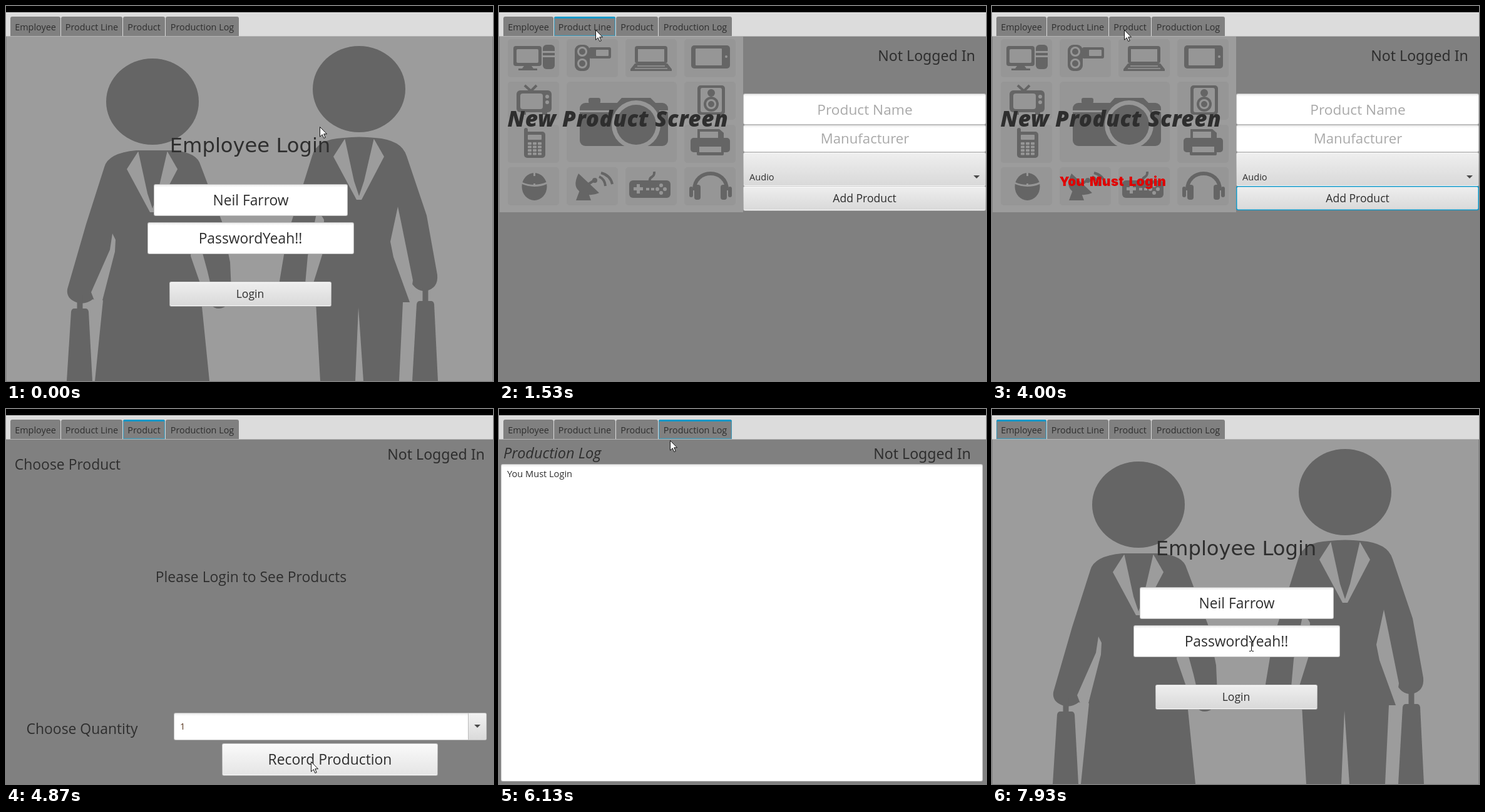
These frames come from a looping animation (778x600 px, 8000 ms). An HTML page with a canvas:

```html
<!DOCTYPE html>
<html lang="en">
<head>
<meta charset="utf-8">
<title>Production tracker</title>
<style>
html, body { margin: 0; width: 100%; height: 100%; overflow: hidden; background: #808080; }
canvas { display: block; width: 778px; height: 600px; }
</style>
</head>
<body>
<canvas id="stage" width="778" height="600"></canvas>
<script>
const ctx = document.getElementById('stage').getContext('2d');
const LOOP = 8000, TICKS_PER_MS = 0.015;
const INK = '#2e2e2e', DARK = '#656565', LIGHT = '#9c9c9c', TILE = '#969696', BLUE = '#0f98c8', RED = '#e00000';
const SANS = '"Open Sans", "Noto Sans", sans-serif';

// Pointer path: tick, x, y
const PATH = [
  [0, 501, 193], [2, 501, 193], [5, 455, 228], [8, 375, 241], [12, 262, 135], [15, 205, 52],
  [19, 154, 38], [26, 154, 38], [31, 260, 130], [36, 440, 280], [39, 470, 302], [41, 460, 300],
  [45, 235, 209], [47, 90, 250], [48, 45, 310], [50, 110, 349], [52, 240, 260], [53, 284, 186],
  [57, 250, 14], [60, 211, 38], [62, 211, 38], [68, 380, 310], [73, 487, 564], [76, 487, 564],
  [80, 190, 581], [82, 30, 575], [83, 16, 540], [86, 190, 190], [88, 285, 46], [90, 296, 39],
  [91, 296, 39], [95, 149, 115], [97, 149, 124], [101, 100, 85], [106, 22, 28], [111, 22, 28],
  [115, 350, 270], [117, 454, 366], [119, 414, 380], [120, 414, 380]
];

function slope(i, k) {
  if (i === 0 || i === PATH.length - 1) return 0;
  const [a, b, c] = [PATH[i - 1], PATH[i], PATH[i + 1]];
  const s = (b[k] - a[k]) / (b[0] - a[0]), r = (c[k] - b[k]) / (c[0] - b[0]);
  return s * r > 0 ? 2 * s * r / (s + r) : 0;
}

function pointerAt(tick) {
  let i = 0;
  while (i < PATH.length - 2 && PATH[i + 1][0] <= tick) i++;
  const a = PATH[i], b = PATH[i + 1], h = b[0] - a[0], u = (tick - a[0]) / h;
  return [1, 2].map(k => {
    const v = 1 - u;
    return a[k] * v * v * (1 + 2 * u) + b[k] * u * u * (3 - 2 * u)
      + h * u * v * (v * slope(i, k) - u * slope(i + 1, k));
  });
}

function rect(x, y, w, h, color, r = 0) {
  ctx.fillStyle = color;
  ctx.beginPath();
  ctx.roundRect(x, y, w, h, r);
  ctx.fill();
}

function oval(x, y, rx, color, ry = rx) {
  ctx.fillStyle = color;
  ctx.beginPath();
  ctx.ellipse(x, y, rx, ry, 0, 0, Math.PI * 2);
  ctx.fill();
}

function shape(d, color) {
  ctx.fillStyle = color;
  ctx.fill(new Path2D(d));
}

function line(d, color, width) {
  ctx.strokeStyle = color;
  ctx.lineWidth = width;
  ctx.stroke(new Path2D(d));
}

function text(str, x, y, size, options = {}) {
  const { color = INK, align = 'center', style = '', family = SANS, spacing = 0, gap = 0 } = options;
  ctx.font = `${style} ${size}px ${family}`;
  ctx.letterSpacing = `${spacing}px`;
  ctx.wordSpacing = `${gap}px`;
  ctx.textAlign = align;
  ctx.fillStyle = color;
  ctx.fillText(str, x, y);
}

const loginState = (x, y) => text('Not Logged In', x, y, 23.1, { family: '"Noto Sans", sans-serif' });

function fade(y, h, from, to) {
  const g = ctx.createLinearGradient(0, y, 0, y + h);
  g.addColorStop(0, from);
  g.addColorStop(1, to);
  return g;
}

const inside = ([px, py], [x, y, w, h]) => px >= x && px < x + w && py >= y && py < y + h;

// An unfocused button shows a one pixel shadow along its bottom
function button(box, { pointer, focus, pressed }) {
  const [x, y, w, h] = box;
  const [from, to] = pressed ? ['#d2d2d2', '#c6c6c6']
    : inside(pointer, box) ? ['#fafafa', '#e4e4e4'] : ['#efefef', '#d8d8d8'];
  if (focus) {
    rect(x, y, w, h - 1, BLUE, 3);
    rect(x + 1.5, y + 1.5, w - 3, h - 4, fade(y, h, from, to), 2);
  } else {
    rect(x, y, w, h, fade(y, h, '#c9c9c9', '#a9a9a9'), 3);
    rect(x + 1, y + 1, w - 2, h - 2, '#fbfbfb', 2);
    rect(x + 1, y + 2, w - 2, h - 4, fade(y, h, from, to), 2);
  }
}

function field(x, y, w, h) {
  rect(x, y, w, h, '#bebebe', 3);
  rect(x + 1, y + 1, w - 2, h - 2, fade(y, 5, '#e4e4e4', '#ffffff'), 2);
}

const caret = (x, y) => shape(`M${x - 5} ${y - 2}h10l-5 5z`, '#4a4a4a');

const TABS = [
  ['Employee', 7, 80], ['Product Line', 88, 98], ['Product', 187, 67], ['Production Log', 255, 117]
];

function header(focused) {
  rect(0, 0, 778, 10, '#000');
  rect(0, 10, 778, 38, '#dcdcdc');
  rect(0, 48, 778, 1, '#b4b4b4');
  TABS.forEach(([name, x, w], i) => {
    rect(x, 17, w, 31, '#808080', [3, 3, 0, 0]);
    if (i === focused) {
      rect(x, 17, w, 3, BLUE, [3, 3, 0, 0]);
      line(`M${x + .5} 18V47.5H${x + w - .5}V18`, '#4096b4', 1);
      line(`M${x + 1.5} 20V46.5H${x + w - 1.5}V20`, '#6f868f', 1);
    }
    text(name, x + w / 2, 38.5, 14.4);
  });
}

// Suit front shared by both figures, relative to the collar centre
function collar(x, y) {
  ctx.save();
  ctx.translate(x, y);
  shape('M-23 1L-41 29L-4 98H4L40 29L24 1Z', LIGHT);
  shape('M-23 -1H24L8 68L0 92L-8 68Z', DARK);
  ctx.restore();
}

function briefcase(x, y) {
  rect(x - 4.5, y - 22, 9, 25, DARK);
  shape(`M${x - 14} ${y + 5}Q${x - 13} ${y} ${x - 9} ${y}H${x + 9}Q${x + 13} ${y} ${x + 14} ${y + 5}L${x + 20} 600H${x - 21}Z`, DARK);
}

function woman() {
  oval(234, 153, 74, DARK, 69);
  shape('M208 231H262Q300 232 309 250L345 345L358 410L360 455Q358 484 340 484Q324 484 324 460L312 471'
    + 'L325 600H142L155 471H142L139 469Q126 479 112 474Q96 468 98 453L128 349L157 258Q163 235 208 231Z', DARK);
  shape('M170 364L175 374L174 393L154 471H141L136 458L166 390Z', LIGHT);
  shape('M297 366L306 366L322 425L329 455L314 455L295 400Z', LIGHT);
  collar(234, 232);
  briefcase(118, 484);
}

function man() {
  oval(564, 133, 74, DARK, 69);
  shape('M539 211Q564 208 590 211Q632 214 640 240L672 335L689 430Q691 452 670 456Q655 457 646 440L645 474H634'
    + 'L628 600H571L563 482L558 600H502L495 474H479L470 455Q438 462 437 440L449 368L489 240Q496 213 539 211Z', DARK);
  shape('M626 321L631 345L650 439L645 474L619 402L614 377Z', LIGHT);
  shape('M496 332Q502 330 508 342L507 392L487 456H477L482 400Z', LIGHT);
  collar(564, 212);
  briefcase(670, 472);
}

const LOGIN = [261, 441, 259, 40], NAME = [236, 285, 310, 51], PASS = [226, 346, 330, 51];

function employeeScreen(pointer) {
  rect(0, 49, 778, 551, LIGHT);
  woman();
  man();
  rect(0, 49, 1, 551, '#858585');
  rect(777, 49, 1, 551, '#858585');
  text('Employee Login', 390, 234, 32.2, { family: '"DejaVu Sans", sans-serif' });
  field(...NAME);
  field(...PASS);
  text('Neil Farrow', 391, 319, 22.8);
  text('PasswordYeah!!', 390.5, 380, 22.8);
  button(LOGIN, { pointer });
  text('Login', 390, 467, 17.6);
}

function gadgets() {
  const col = [14, 108, 202, 296], row = [53, 121, 190, 258];
  col.forEach((x, c) => row.forEach((y, r) => {
    if (c % 3 === 0 || r % 3 === 0) rect(x, y, 82, 61, TILE, 5);
  }));
  rect(108, 121, 176, 129, TILE, 6);

  // desktop
  rect(23, 64, 45, 32, DARK, 4);
  rect(28, 69, 35, 22, TILE, 2);
  shape('M40 96h12l3 4h6v3H31v-3h6z', DARK);
  rect(70, 62, 19, 39, DARK, 6);
  rect(70, 72, 19, 3, TILE);
  rect(70, 79, 19, 3, TILE);
  // camcorder
  rect(121, 62, 24, 42, DARK, 9);
  oval(133, 73, 8, TILE);
  oval(133, 73, 5, DARK);
  oval(133, 92, 8, TILE);
  oval(133, 92, 5, DARK);
  rect(144, 66, 35, 18, DARK, 3);
  rect(155, 70, 20, 10, TILE, 1);
  // laptop
  rect(217, 64, 52, 28, DARK, 4);
  rect(222, 69, 42, 20, TILE);
  shape('M217 92H269L276 101V104H210V101Z', DARK);
  line('M221 96H265M217 100H269', TILE, 1.5);
  // tablet
  rect(307, 63, 62, 37, DARK, 5);
  rect(314, 68, 42, 27, TILE, 1);
  oval(363, 81, 2, TILE);
  // television
  line('M41 127L51 136L60 127', DARK, 4);
  rect(28, 135, 56, 35, DARK, 6);
  rect(34, 140, 36, 25, TILE, 4);
  oval(77, 145, 3, TILE);
  oval(77, 154, 3, TILE);
  rect(35, 170, 8, 4, DARK);
  rect(69, 170, 8, 4, DARK);
  // camera
  rect(143, 147, 19, 9, DARK, 3);
  shape('M186 158L196 147H242L253 158Z', DARK);
  rect(129, 155, 141, 69, DARK, 9);
  rect(129, 167, 53, 3, TILE);
  rect(256, 167, 14, 3, TILE);
  oval(219, 190, 39, TILE);
  oval(219, 190, 32, DARK);
  // speaker
  rect(317, 127, 44, 47, DARK, 5);
  rect(322, 131, 34, 39, TILE, 3);
  oval(339, 139, 6, DARK);
  oval(339, 157, 12, DARK);
  oval(339, 157, 8, TILE);
  oval(339, 157, 5, DARK);
  // phone
  rect(40, 195, 6, 16, DARK, 3);
  rect(40, 201, 34, 42, DARK, 5);
  rect(46, 206, 22, 8, TILE, 1);
  for (let i = 0; i < 12; i++) rect(46 + i % 3 * 8, 218 + Math.floor(i / 3) * 5.5, 6, 4, TILE, 1);
  // printer
  shape('M317 211V197H352L359 203V211Z', DARK);
  rect(321, 201, 29, 10, TILE);
  rect(306, 211, 63, 23, DARK, 5);
  rect(316, 222, 43, 17, DARK, 2);
  rect(320, 225, 35, 9, TILE);
  // mouse
  oval(56.5, 289, 20, DARK, 22);
  line('M36 283Q56 292 77 283M56.5 267V287', TILE, 3);
  rect(53, 272, 7, 12, DARK, 3);
  // satellite dish
  shape('M127 268Q116 290 131 298Q145 306 160 299Z', DARK);
  shape('M130 292L123 311H147L142 297Z', DARK);
  line('M143 285L152 279', DARK, 4);
  oval(153, 279, 4, DARK);
  line('M160 273Q169 277 170 288M163 267Q178 271 181 285', DARK, 4);
  // gamepad
  line('M241 282C239 270 249 277 248 265', DARK, 4);
  rect(208, 279, 66, 28, DARK, 6);
  rect(215, 290, 15, 5, TILE);
  rect(220, 285, 5, 15, TILE);
  rect(235, 291, 5, 4, TILE);
  rect(243, 291, 5, 4, TILE);
  [[253, 293], [259, 287], [265, 293], [259, 299]].forEach(([x, y]) => oval(x, y, 3, TILE));
  // headphones
  line('M312 295C311 259 365 259 364 295', DARK, 6);
  rect(304, 289, 6, 17, DARK, 3);
  rect(312, 286, 10, 24, DARK, 4);
  rect(354, 286, 10, 24, DARK, 4);
  rect(366, 289, 6, 17, DARK, 3);
}

const ADD = [390, 288, 388, 40];

function productLineScreen(pointer, tick) {
  rect(0, 49, 778, 551, '#808080');
  rect(1, 49, 389, 281, LIGHT);
  gadgets();
  text('New Product Screen', 190, 193, 35, { style: 'italic 800', spacing: 0.6 });
  if (tick >= 41) {
    text('You Must Login', 193, 288, 20.5, {
      color: RED, style: '900', family: 'Inter, "Open Sans", sans-serif', spacing: 0.5, gap: 3
    });
  }
  loginState(683, 88);
  field(390, 140, 388, 50);
  field(390, 190, 388, 44);
  text('Product Name', 584.5, 174, 22.7, { color: '#a9a9a9' });
  text('Manufacturer', 584.5, 220, 22.2, { color: '#a9a9a9' });
  button([390, 234, 388, 55], { pointer });
  text('Audio', 400, 279, 14.6, { align: 'left' });
  caret(763, 273);
  button(ADD, { pointer, focus: tick >= 39, pressed: tick >= 39 && tick < 41 });
  text('Add Product', 584, 314, 17.6);
}

const RECORD = [345, 535, 345, 52];

function productScreen(pointer, tick) {
  rect(0, 49, 778, 551, '#808080');
  text('Choose Product', 98.5, 97, 22.9);
  loginState(687, 81);
  text('Please Login to See Products', 391.5, 277, 22.9);
  text('Choose Quantity', 121.5, 520, 22.9);
  field(268, 486, 500, 44);
  rect(738, 487, 29, 42, fade(487, 42, '#f2f2f2', '#dadada'), [0, 2, 2, 0]);
  rect(738, 487, 1, 42, '#bcbcbc');
  text('1', 278, 513, 14.6, { align: 'left', color: '#5c3a22' });
  caret(753, 507);
  button(RECORD, { pointer, focus: tick >= 75, pressed: tick === 75 });
  text('Record Production', 517.5, 569, 22.9);
  if (tick >= 76) text('You Must Login', 163, 569, 23.1, { color: RED });
}

function logScreen() {
  rect(0, 49, 778, 551, '#808080');
  text('Production Log', 85, 79, 23.6, { style: 'italic' });
  loginState(676, 80);
  field(3, 88, 770, 508);
  text('You Must Login', 13, 109, 14.6, { align: 'left' });
}

function cursor([x, y], typing) {
  ctx.save();
  ctx.translate(Math.round(x), Math.round(y));
  if (typing) {
    line('M-3 -7.5H-1L.5 -6.5L2 -7.5H4M.5 -6.5V6.5M-3 7.5H-1L.5 6.5L2 7.5H4', '#111', 1);
  } else {
    const arrow = 'M.5 .5V16.2L4.2 12.7L6.8 18.5L9.2 17.5L6.7 11.8H11.5Z';
    shape(arrow, '#fff');
    line(arrow, '#111', 1);
  }
  ctx.restore();
}

const SCREENS = [employeeScreen, productLineScreen, productScreen, logScreen];

function stateAt(tick) {
  if (tick < 23) return { screen: 0, focus: -1 };
  if (tick < 63) return { screen: 1, focus: tick < 39 ? 1 : -1 };
  if (tick < 92) return { screen: 2, focus: tick < 75 ? 2 : -1 };
  if (tick < 110) return { screen: 3, focus: 3 };
  return { screen: 0, focus: 0 };
}

function draw(now) {
  const tick = Math.floor((now % LOOP + 4) * TICKS_PER_MS) % 120;
  const pointer = pointerAt(tick), { screen, focus } = stateAt(tick);
  SCREENS[screen](pointer, tick);
  header(focus);
  cursor(pointer, screen === 0 && [NAME, PASS].some(box => inside(pointer, box)));
}

let start;
function frame(now) {
  start ??= now;
  draw(now - start);
  requestAnimationFrame(frame);
}
draw(0);
requestAnimationFrame(frame);
</script>
</body>
</html>
```
